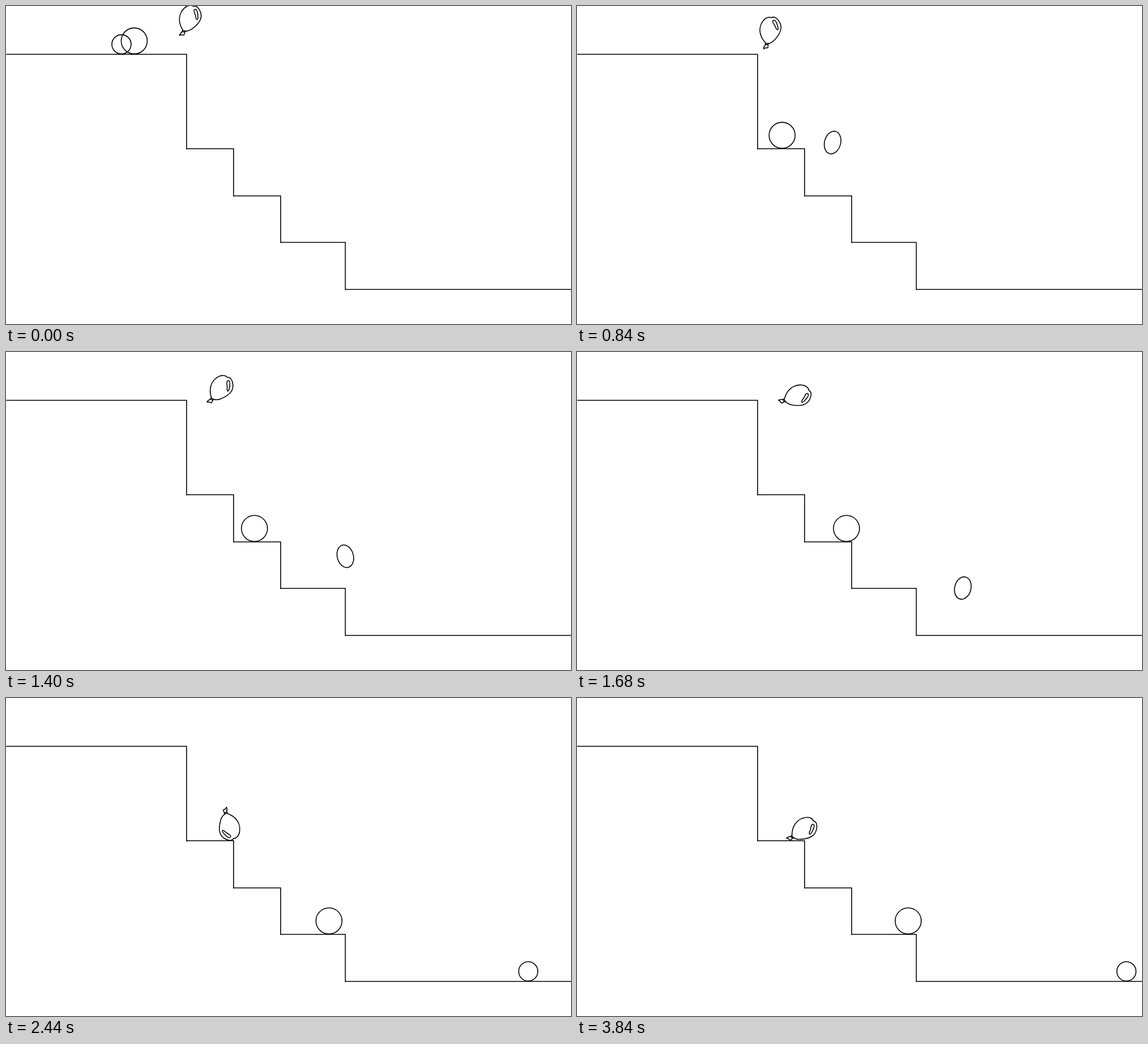
Write an HTML page that moves like this. It is 998 px wide and 561 px high and loops after 4250 ms.

```html
<!DOCTYPE html>
<html lang="en">
<head>
<meta charset="utf-8">
<title>Balls and balloon on stairs</title>
<style>
  html, body { margin: 0; width: 100%; height: 100%; overflow: hidden; background: #fff; }
  svg { display: block; width: 998px; height: 561px; }
  svg * { fill: none; stroke: #000; stroke-width: 1.6; stroke-linecap: round; stroke-linejoin: round; }
</style>
</head>
<body>
<svg viewBox="0 0 998 561">
  <path id="stairs"/>
  <ellipse id="small"/>
  <circle id="big"/>
  <g id="balloon">
    <path d="M.5-22C-3-24-10-22-14-15.5C-19-8-20 2-16 11C-14 16-10 20-7 23.5C-3 25 4 22 8 17C14 10 18 3 18.5-4C19-12 13-20 8-22.5C5-24 2-23 .5-22"/>
    <path d="M-7 23L-8 25.5L-3 26L-2.5 23.5M-7.5 26C-9 28-11 30-10.5 33.5C-8 31-6 31-4 31.5Q-2.5 31-3 26"/>
    <path d="M8.5-16C7-18.5 4-18.5 3.5-16C3-13 6-11.5 8-7.5C9.5-4 11-1 12.5-1C14.5-1.5 13-8 9.5-15"/>
  </g>
</svg>
<script>
const LOOP = 4250, LAST = 3840, STEP = 40;
const SMALL_R = 17, BIG_R = 23, GAP = 0.7;
const [stairs, small, big, balloon] =
  ['stairs', 'small', 'big', 'balloon'].map(id => document.getElementById(id));

const levels = [85.3, 251.8, 335, 417, 500];
const edges = [319, 402, 485.2, 599.4, 998];
stairs.setAttribute('d', levels.map((y, i) =>
  `M${i ? edges[i - 1] : 1} ${y}H${edges[i]}` + (i < 4 ? `V${levels[i + 1] + 0.6}` : '')).join(''));

// Key points: [time, ...values]
const smallX = [[0, 204], [520, 368.5], [1120, 522.5], [1680, 681.5], [2240, 869], [2440, 922.5], [2880, 970.5]];
const bigX = [[0, 226.5], [520, 316], [1120, 400.5], [1680, 476], [2440, 570.5], [3080, 584], [3500, 585]];
const balloonPose = [[0, 325, 22, 14], [520, 325.5, 32, 0], [1120, 362.5, 54, 8], [1680, 390, 78, 61],
  [2240, 390, 181, 140], [2440, 393.5, 227.5, 156], [2800, 363, 213, 6], [3080, 372.5, 223, 18],
  [3840, 401.3, 231.8, 46]];

// Small ball: a drop, a long bounce, then bounces that die out
const rest = level => levels[level] - SMALL_R - GAP;
const drop = rest(2) - rest(0);
const hops = [
  { start: 435, span: 210, from: rest(0), to: rest(2), rise: drop / 4, stretch: 0 },
  { start: 645, span: 910, from: rest(2), to: rest(4), rise: 166, stretch: 1 },
];
for (let start = 1555, span = 440, rise = 81; rise > 1; start += span, span *= 0.54, rise *= 0.3) {
  hops.push({ start, span, from: rest(4), to: rest(4), rise, stretch: rise / 81 });
}

const clamp = (v, low, high) => Math.max(low, Math.min(high, v));

// Monotone cubic through key points, coming to rest at the last one
function sample(keys, t, col = 1) {
  const n = keys.length - 1;
  if (t >= keys[n][0]) return keys[n][col];
  const i = keys.findIndex(key => key[0] > t) - 1;
  const slope = k => {
    if (k === n) return 0;
    const j = Math.max(0, k);
    return (keys[j + 1][col] - keys[j][col]) / (keys[j + 1][0] - keys[j][0]);
  };
  const tangent = k => {
    const a = slope(k - 1), b = slope(k);
    return a * b > 0 ? 2 * a * b / (a + b) : 0;
  };
  const [p, q] = [keys[i], keys[i + 1]];
  const d = q[0] - p[0], u = (t - p[0]) / d, v = 1 - u;
  return p[col] * v * v * (1 + 2 * u) + q[col] * u * u * (3 - 2 * u)
    + d * u * v * (tangent(i) * v - tangent(i + 1) * u);
}

function drawSmall(t) {
  const hop = hops.findLast(h => h.start <= t) || hops[0];
  const u = clamp((t - hop.start) / hop.span, 0, 1);
  const y = hop.from + (hop.to - hop.from) * u - 4 * hop.rise * u * (1 - u);
  // Stretched along its path near the ends of a bounce, round at the top
  const lean = clamp(2 * u - 1, -0.46, 0.46) * hop.stretch;
  const stretch = 1 + 0.42 * Math.abs(lean);
  small.setAttribute('rx', SMALL_R / stretch);
  small.setAttribute('ry', SMALL_R * stretch);
  small.setAttribute('transform', `translate(${sample(smallX, t)} ${y}) rotate(${-33 * lean})`);
}

function drawBig(t) {
  // Falls one step each time it rolls over an edge
  const y = [570, 1130, 1740].reduce((sum, start, i) => {
    const depth = levels[i + 1] - levels[i];
    return sum + depth * clamp((t - start) / (17 * Math.sqrt(depth)), 0, 1) ** 2;
  }, levels[0] - BIG_R - GAP);
  big.setAttribute('r', BIG_R);
  big.setAttribute('transform', `translate(${sample(bigX, t)} ${y})`);
}

function drawBalloon(t) {
  const [x, y, angle] = [1, 2, 3].map(col => sample(balloonPose, t, col));
  balloon.setAttribute('transform', `translate(${x} ${y}) rotate(${angle})`);
}

const origin = performance.now();
function tick() {
  const elapsed = (performance.now() - origin) % LOOP;
  const t = Math.min(LAST, Math.floor(elapsed / STEP) * STEP);
  drawSmall(t);
  drawBig(t);
  drawBalloon(t);
  requestAnimationFrame(tick);
}
tick();
</script>
</body>
</html>
```
